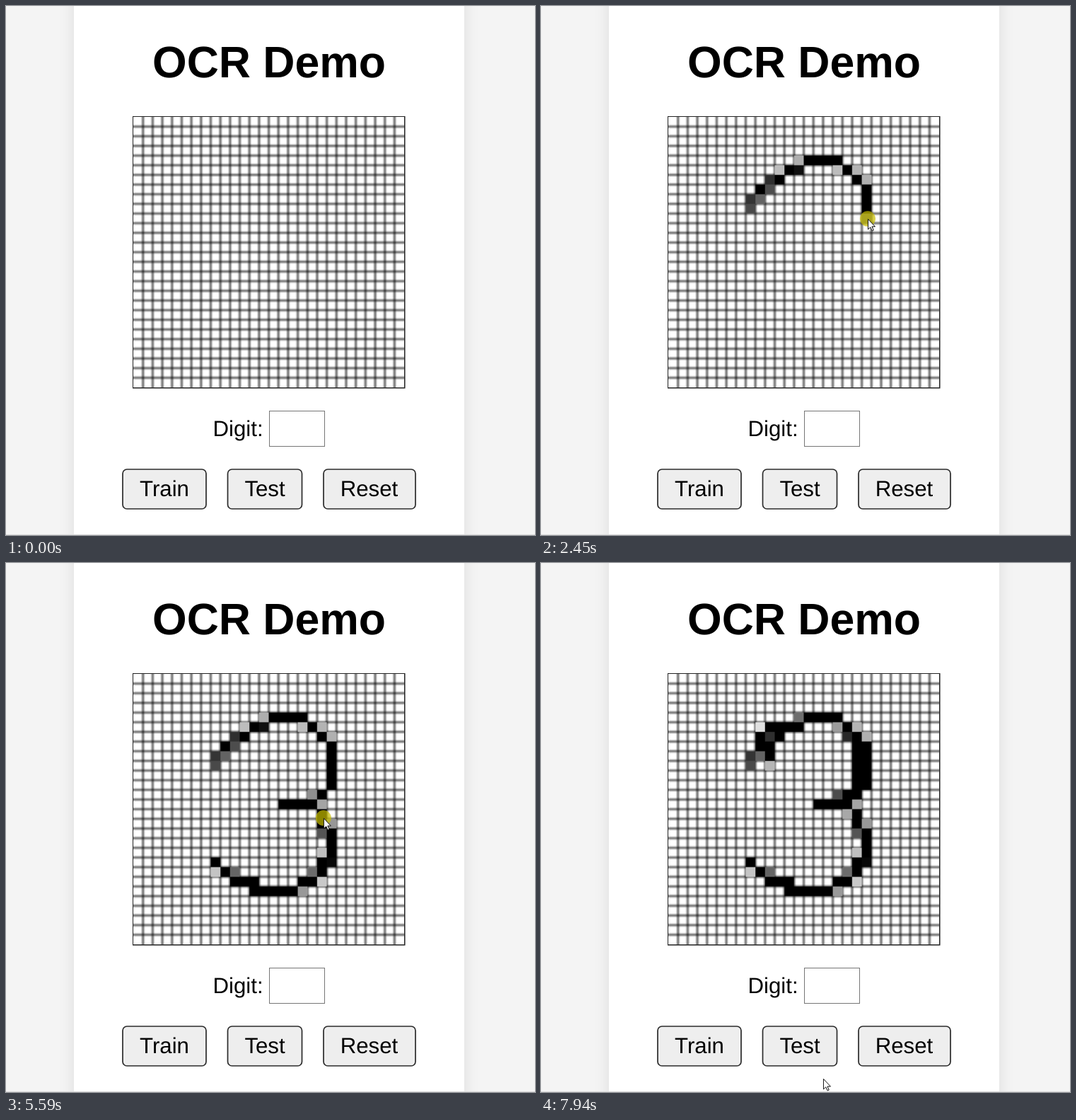
Write an HTML page with a canvas that moves like this. It is 748x749 px and loops after 8 s.

```html
<!DOCTYPE html>
<html lang="en">
<head>
<meta charset="utf-8">
<title>OCR Demo</title>
<style>
  html, body { margin: 0; width: 100%; height: 100%; overflow: hidden; background: #f4f4f4; }
  #stage { position: relative; width: 748px; height: 749px; overflow: hidden; }
  #card { position: absolute; left: 96px; top: -40px; width: 552px; height: 830px; background: #fff; box-shadow: 0 0 20px rgba(0, 0, 0, .1); }
  svg { position: absolute; left: 0; top: 0; }
  canvas { position: absolute; left: 180.4px; top: 157.4px; width: 382.8px; height: 382.8px; }
  text { font: 31.2px "Liberation Sans", Arial, sans-serif; text-rendering: geometricPrecision; }
  .title { font-size: 62.5px; font-weight: bold; }
  .mid { text-anchor: middle; }
  .button { fill: #eee; stroke: #2b2b2b; stroke-width: 1.7; }
</style>
</head>
<body>
<div id="stage">
  <div id="card"></div>
  <svg width="748" height="749">
    <text class="title mid" x="372" y="101">OCR Demo</text>
    <rect x="179" y="156" width="385.5" height="385.5" fill="#222"/>
    <text x="292.5" y="609">Digit:</text>
    <rect x="372.5" y="573.5" width="78" height="50" fill="#fff" stroke="#767676"/>
    <g class="button">
      <rect x="165" y="656" width="118" height="56" rx="6"/>
      <rect x="313.5" y="656" width="105" height="56" rx="6"/>
      <rect x="449" y="656" width="130" height="56" rx="6"/>
    </g>
    <g class="mid">
      <text x="224" y="694">Train</text>
      <text x="366" y="694">Test</text>
      <text x="513.5" y="694">Reset</text>
    </g>
    <path d="M0 748.5H748" stroke="#ddd"/>
  </svg>
  <canvas id="pad" width="280" height="280"></canvas>
  <svg width="748" height="749">
    <g id="pointer">
      <circle id="halo" r="11" fill="#c8be00" fill-opacity=".7"/>
      <path d="M.5 .5V15L3.8 11.9L6.2 17L8.3 16L6 11.1H10.5Z" fill="#fff" stroke="#111" stroke-linejoin="round"/>
    </g>
  </svg>
</div>
<script>
const LOOP = 8000, SIZE = 28, PITCH = 13.67, LEFT = 180.4, TOP = 157.4;
const PRESS = 930, RELEASE = 7420, STEP = 5, FLOW = 1.15;
const pad = document.getElementById('pad').getContext('2d');
const pointer = document.getElementById('pointer');
const halo = document.getElementById('halo');

// Key points of the hand: [time, x, y]
const route = [
  [0, 720, 790], [70, 683, 742], [600, 325, 290], [760, 304, 276],
  // draw a 3
  [930, 294, 288], [1300, 311, 264], [1680, 355, 232], [2050, 408, 219], [2350, 459, 258],
  [2450, 462, 301], [2640, 443, 332], [2820, 395, 342], [3040, 396, 342], [3280, 442, 347],
  [3520, 454, 427], [3780, 403, 462], [4050, 338, 452], [4330, 294, 424],
  // trace it back
  [4500, 325, 449], [4690, 365, 463], [4900, 404, 462], [5130, 442, 437], [5380, 458, 393],
  [5650, 444, 354], [5890, 414, 338], [6080, 438, 328], [6290, 447, 298], [6490, 444, 257],
  [6800, 413, 220], [7100, 338, 236], [7380, 318, 262],
  // leave
  [7640, 368, 500], [7850, 408, 722], [7940, 399, 730], [8000, 399, 730]
];

// Smooth curve through the key points (Hermite, tangents from the neighbours)
function pointerAt(time) {
  const i = Math.max(1, route.findIndex(p => p[0] > time));
  const b = route[i - 1], c = route[i];
  const a = route[i - 2] || b, d = route[i + 1] || c;
  const span = c[0] - b[0], k = (time - b[0]) / span;
  return [1, 2].map(n => {
    const out = (c[n] - a[n]) / (c[0] - a[0]) * span;
    const into = (d[n] - b[n]) / (d[0] - b[0]) * span;
    const rise = k * k * (3 - 2 * k);
    return b[n] + (c[n] - b[n]) * rise + out * k * (1 - k) ** 2 - into * k * k * (1 - k);
  });
}

// Ink flows into the cell below the pen by the length drawn there.
const drops = [];
let last = pointerAt(PRESS);
for (let time = PRESS; time < RELEASE; time += STEP) {
  const [x, y] = pointerAt(time);
  const cell = Math.floor((x - LEFT) / PITCH) + SIZE * Math.floor((y - TOP) / PITCH);
  drops.push({ time, cell, ink: FLOW * Math.hypot(x - last[0], y - last[1]) / PITCH });
  last = [x, y];
}

function drawPad(time) {
  pad.fillStyle = '#fff';
  pad.fillRect(0, 0, 280, 280);
  pad.fillStyle = 'rgba(0,0,0,.3)';
  for (let i = 1; i < SIZE; i++) {
    for (const width of [3.2, 1.8]) {
      pad.fillRect(i * 10 - width / 2, 0, width, 280);
      pad.fillRect(0, i * 10 - width / 2, 280, width);
    }
  }
  const inks = new Float32Array(SIZE * SIZE);
  for (const drop of drops) {
    if (drop.time > time) break;
    inks[drop.cell] += drop.ink;
  }
  inks.forEach((ink, cell) => {
    if (ink < .1) return;
    const tone = 255 * (1 - Math.min(1, ink));
    pad.fillStyle = `rgb(${tone},${tone},${tone})`;
    pad.fillRect(cell % SIZE * 10, Math.floor(cell / SIZE) * 10, 10, 10);
  });
}

function frame() {
  const time = performance.now() % LOOP;
  const [x, y] = pointerAt(time);
  drawPad(time);
  pointer.setAttribute('transform', `translate(${x} ${y})`);
  halo.style.display = time >= PRESS && time < RELEASE ? '' : 'none';
  requestAnimationFrame(frame);
}
frame();
</script>
</body>
</html>
```
